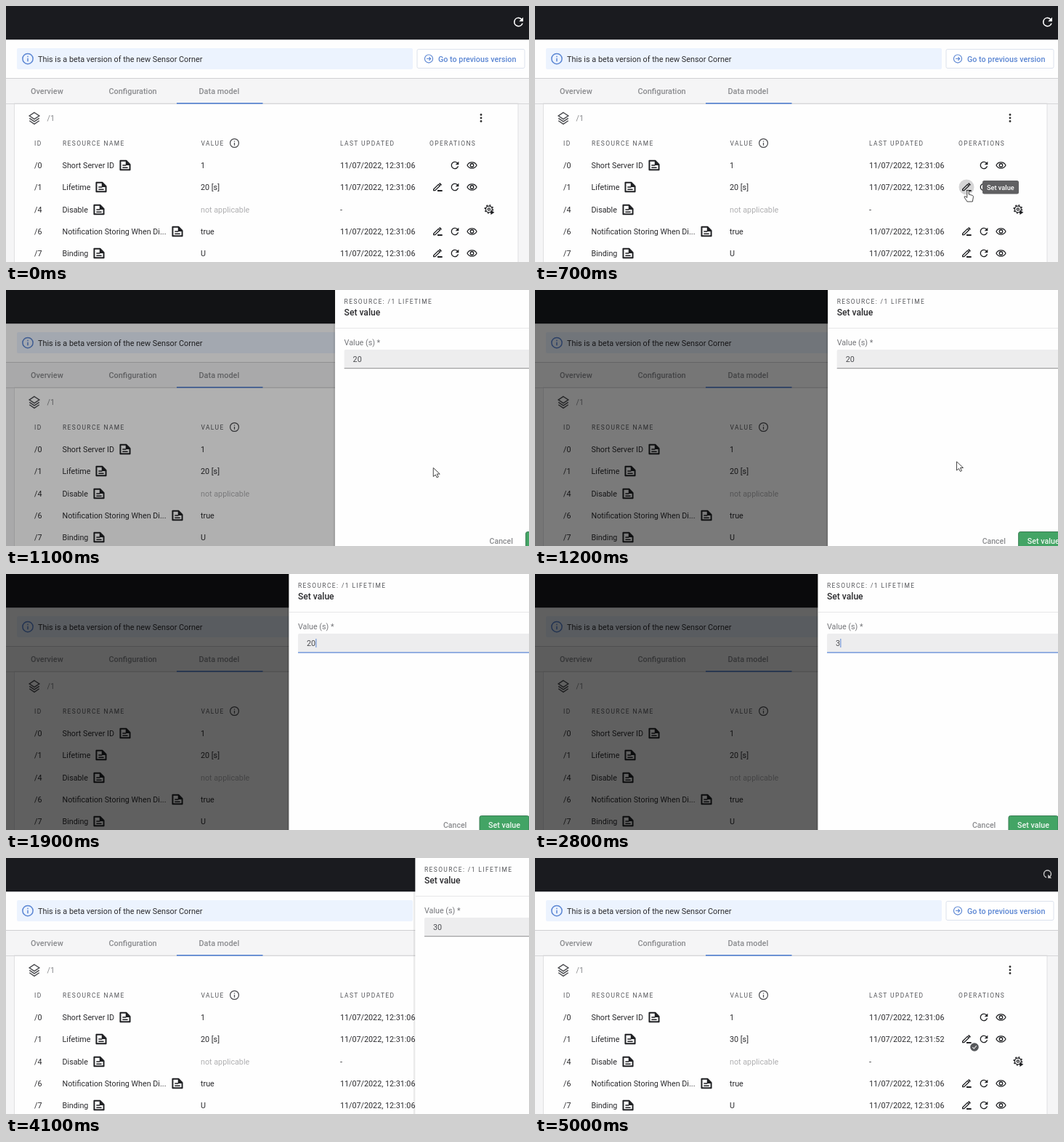
An HTML page that plays this animation: 720 by 352 pixels, repeating every 5100 ms.

```html
<!DOCTYPE html>
<html lang="en">
<head>
<meta charset="utf-8">
<title>Set a resource value</title>
<style>
  html, body { margin: 0; width: 100%; height: 100%; overflow: hidden; background: #f5f5f6; }
  svg { display: block; width: 100vw; height: 100vh; }
  text { font: 10.75px Roboto, sans-serif; fill: #2b2b2e; white-space: pre; }
  .medium { font-weight: 500; }
  .caps { font-size: 8.45px; letter-spacing: 1.4px; fill: #55565a; }
  .icon { fill: none; stroke: #202124; stroke-width: 2; }
</style>
</head>
<body>
<svg id="stage" viewBox="0 0 720 352"></svg>
<script>
const LOOP = 5100, STEP = 100;
const BLUE = '#5b86d3', DARK = '#202124', GREY = '#8a8b8e';
const stage = document.getElementById('stage');

const clamp = v => Math.max(0, Math.min(1, v));
const progress = (t, from, to) => clamp((t - from) / (to - from));
const smooth = p => p * p * (3 - 2 * p);
const mix = (a, b, p) => a + (b - a) * p;

const text = (x, y, s, cls = '', style = '') =>
  `<text x="${x}" y="${y}" class="${cls}" style="${style}">${s}</text>`;
const rect = (x, y, w, h, fill, extra = '') =>
  `<rect x="${x}" y="${y}" width="${w}" height="${h}" fill="${fill}" ${extra}/>`;
const circle = (x, y, r, fill, extra = '') =>
  `<circle cx="${x}" cy="${y}" r="${r}" fill="${fill}" ${extra}/>`;

// Icons live on a 24-unit grid centred on (x, y).
const icon = (x, y, size, body, turn = 0) =>
  `<g class="icon" transform="translate(${x} ${y}) rotate(${turn}) scale(${size / 24}) translate(-12 -12)">${body}</g>`;
const solid = (d, fill = DARK) => `<path d="${d}" fill="${fill}" stroke="none"/>`;
const line = (d, extra = '') => `<path d="${d}" ${extra}/>`;

const refresh = (x, y, size, color, turn) => icon(x, y, size, solid(
  'M17.65 6.35A7.96 7.96 0 0 0 12 4a8 8 0 1 0 7.73 10h-2.08A6 6 0 1 1 12 6c1.66 0 3.14.69 4.22 1.78L13 11h7V4z', color), turn);
const eye = (x, y) => icon(x, y, 15.5,
  line('M2 12C6 3.5 18 3.5 22 12C18 20.5 6 20.5 2 12Z') + circle(12, 12, 3.5, 'none'));
const pen = (x, y) => icon(x, y, 16,
  line('M4 19v-2.5L14 6.5 17 9.5 7 19Z') + solid('M15 5l2-2 4 4-2 2z') + line('M12 19.5h10', 'stroke-width="3"'));
const gear = (x, y) => icon(x, y, 15,
  circle(11, 11, 7, 'none') + circle(11, 11, 9, 'none', 'stroke-width="2.5" stroke-dasharray="3 4.07"') +
  circle(11, 11, 2.5, 'none') + solid('M15 13l8 5-8 5z'));
const note = (x, y) => icon(x, y, 17.5,
  line('M3 3.5h11l7 7v10H3z', 'stroke-width="2.7" stroke-linejoin="round"') +
  solid('M13 3l9 9h-9z') + line('M7 12h7M7 16.5h10', 'stroke-width="2.2"'));
const info = (x, y, size, color) => icon(x, y, size,
  `<g stroke="${color}">${circle(12, 12, 9.5, 'none')}${line('M12 11v6M12 7v2')}</g>`);
const layers = icon(39, 154, 18,
  `<g stroke="#4b4c50">${line('M12 2L21 8l-9 6-9-6zM3 12.5l9 6 9-6M3 17l9 6 9-6')}</g>`);
const backArrow = icon(582, 72.5, 14,
  `<g stroke="${BLUE}">${circle(12, 12, 9.5, 'none')}${line('M7 12h9M12.5 8l4 4-4 4')}</g>`);

const arrowCursor = (x, y) =>
  `<path transform="translate(${x} ${y})" d="M0 0v12l3-2.5 2 4 2-1-2-4h4z" fill="#fff" stroke="#333" stroke-width=".9"/>`;
const handCursor = (x, y) =>
  `<path transform="translate(${x} ${y})" d="M-1.2 1Q0-1 1.2 1V6l5 1.4q1.5.5 1.2 2.4L6.3 16H-1L-5 10q0-2 2-1l1.8 1.5Z" fill="#fff" stroke="#333" stroke-width=".9"/>`;

const rows = [
  { id: '/0', y: 219, name: 'Short Server ID', noteX: 164, value: '1' },
  { id: '/1', y: 249, name: 'Lifetime', noteX: 131, editable: true },
  { id: '/4', y: 280, name: 'Disable', noteX: 128, action: true },
  { id: '/6', y: 310, name: 'Notification Storing When Di...', noteX: 236, value: 'true', editable: true },
  { id: '/7', y: 340, name: 'Binding', noteX: 128, value: 'U', editable: true },
];

function tableRow(row, updated) {
  const { id, y, name, noteX, editable, action } = row;
  const lifetime = id === '/1';
  const value = lifetime ? (updated ? '30 [s]' : '20 [s]') : row.value;
  const base = y + 4;
  const start = text(39, base, id) + text(77.5, base, name) + note(noteX, y);
  if (action) return start + text(268, base, 'not applicable', '', 'fill:#b0b0b2') +
    text(460, base, '-') + gear(665.5, y);
  return start + text(268, base, value) +
    text(460, base, '11/07/2022, 12:31:' + (lifetime && updated ? '52' : '06')) +
    (editable ? pen(594, y) : '') + refresh(618, y, 16, DARK) + eye(641.5, y);
}

function page(t) {
  const loading = t >= 4400, updated = t >= 4600, hover = t >= 700 && t <= 1000;
  const spin = loading ? 90 + (t - 5000) * 0.6 : 0;
  return rect(0, 0, 720, 352, '#f5f5f6') +
    rect(0, 46, 720, 53, '#fefefe') + rect(0, 46, 720, 1, '#c9c9cb') +
    rect(0, 0, 720, 46, '#1a1b1f') +
    refresh(705.5, 22, loading ? 17 : 19.5, loading ? '#c8c8c8' : '#fff', spin) +
    rect(15, 58, 545, 29, '#ecf3fe', 'rx="2"') + info(30, 72.5, 18, BLUE) +
    text(44, 76.5, 'This is a beta version of the new Sensor Corner', '', 'font-size:10.85px') +
    rect(566, 59.5, 148, 26, '#fff', 'rx="2" stroke="#dce2ed"') + backArrow +
    text(595, 76.5, 'Go to previous version', 'medium', `fill:${BLUE}`) +
    rect(0, 99, 720, 1, '#d0d0d2') +
    ['Overview', 'Configuration', 'Data model'].map((s, i) =>
      text([34, 141.5, 265.5][i], 121, s, 'medium', `font-size:10.9px;fill:${GREY}`)).join('') +
    rect(11.5, 134, 693.5, 230, '#fefefe', 'stroke="#e0e0e2"') +
    rect(0, 134, 720, 1, '#d6d6d8') + rect(235, 133, 118.5, 1.7, BLUE) +
    layers + text(56.5, 158, '/1', '', `fill:${GREY}`) +
    [149.5, 154, 158.5].map(y => circle(654, y, 1.4, '#333')).join('') +
    [['ID', 39], ['RESOURCE NAME', 78], ['VALUE', 268.5], ['LAST UPDATED', 460], ['OPERATIONS', 583]]
      .map(([s, x]) => text(x, 192, s, 'caps')).join('') +
    info(314.5, 188.5, 15, '#4b4c50') +
    (hover ? circle(594, 249, 10.5, '#d5d5d6') : '') +
    rows.map(row => tableRow(row, updated)).join('') +
    (hover ? rect(616, 240, 50, 18.5, '#606062', 'rx="2.5"') +
      text(622, 252.5, 'Set value', 'medium', 'font-size:9.2px;fill:#fff') : '') +
    (updated ? circle(605, 260, 5.8, '#55575a') +
      '<path d="M602.3 260.2l2 2 3.5-4" fill="none" stroke="#ddd" stroke-width="1.2"/>' : '');
}

function drawer(t) {
  if (t < 1000 || t >= 4300) return '';
  const offset = 330 * (t < 3800 ? Math.exp((993 - t) / 65) : smooth(progress(t, 3885, 4300)));
  const focused = t >= 1800 && t < 3800;
  const typed = t < 2100 ? '20' : t < 2200 ? '2' : t < 2800 ? '' : t < 2900 ? '3' : '30';
  const caret = t >= 1800 && t < 3200;
  return `<g transform="translate(${390 + offset} 0)">` +
    rect(-3, 0, 3, 352, '#000', 'opacity=".08"') +
    rect(-0.6, 0, 345, 352, '#fefefe') +
    text(12, 19, 'RESOURCE: /1 LIFETIME', 'caps') +
    text(12, 35, 'Set value', 'medium', 'font-size:12.1px') +
    rect(0, 52, 345, 1, '#e6e6e8') +
    text(12, 75.5, 'Value (s) *', '', 'fill:#747579') +
    rect(12, 82, 333, 26, '#ededee', 'rx="2"') +
    rect(12, 107.2, 333, focused ? 1.6 : 1, focused ? '#7c9fdc' : '#8e8e90') +
    text(24, 98.7, typed, '', 'fill:#4a4b4f') +
    (caret ? rect(24.3 + typed.length * 6.04, 89, 1, 12, BLUE) : '') +
    text(212, 349, 'Cancel', 'medium', `font-size:10.5px;fill:${GREY}`) +
    rect(262, 332.5, 68, 27, '#43a465', 'rx="2.5" stroke="#3a7d54"') +
    text(274, 349, 'Set value', 'medium', 'fill:#eef7f1') + '</g>';
}

function cursor(t) {
  if (t >= 200 && t < 700) {
    const p = smooth(progress(t, 100, 700));
    return arrowCursor(mix(650, 596, p), mix(352, 252, p));
  }
  if (t >= 700 && t <= 1000) return handCursor(596, 253);
  if (t > 1000 && t < 1800) {
    const settle = progress(t, 1000, 1200), toField = smooth(progress(t, 1400, 1800));
    return arrowCursor(mix(mix(596, 580.5, settle), 470, toField), mix(mix(253, 236, settle), 94, toField));
  }
  if (t >= 3200 && t < 3700) {
    const p = smooth(progress(t, 3100, 3700));
    return arrowCursor(mix(470, 685, p), mix(94, 352, p));
  }
  return '';
}

function draw(t) {
  const dim = 0.62 * progress(t, 950, 1250) * (1 - progress(t, 3750, 4080));
  stage.innerHTML = page(t) + rect(0, 0, 720, 352, '#000', `opacity="${dim}"`) + drawer(t) + cursor(t);
}

const begin = performance.now();
let shown = -1;
function tick() {
  const t = Math.floor(((performance.now() - begin) % LOOP) / STEP) * STEP;
  if (t !== shown) draw(shown = t);
  requestAnimationFrame(tick);
}
tick();
</script>
</body>
</html>
```
